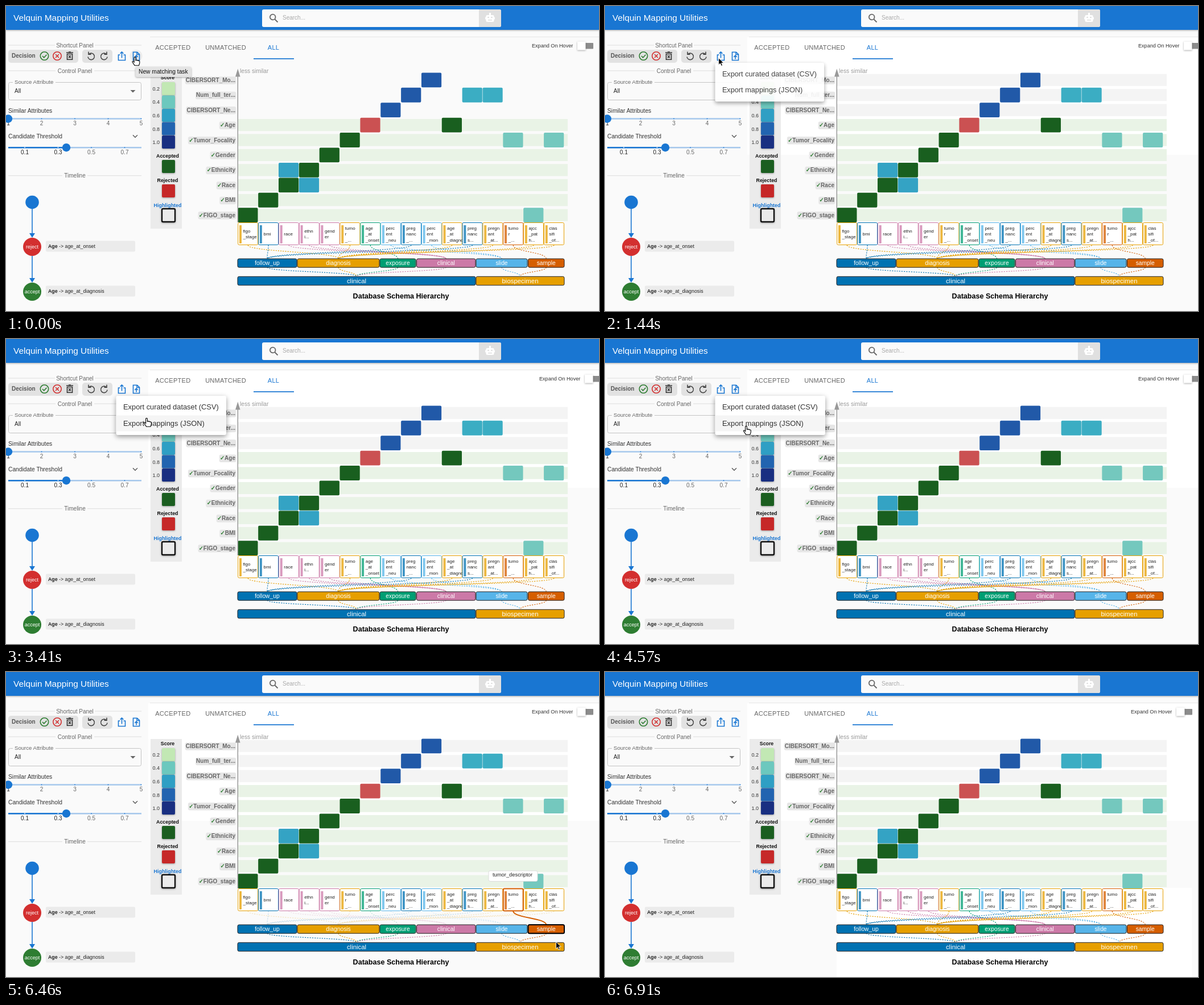
These frames come from a looping animation (1042x537 px, 7470 ms). An HTML page:

```html
<!DOCTYPE html>
<html lang="en">
<head>
<meta charset="utf-8">
<title>Schema matching</title>
<style>
html, body { margin: 0; width: 100%; height: 100%; overflow: hidden; background: #fafafa; }
svg { display: block; width: 1042px; height: 537px; font-family: "Liberation Sans", Arial, sans-serif; }
text { white-space: pre; }
.soft { filter: drop-shadow(0 1px 1.5px #0005); }
.menu { filter: drop-shadow(0 3px 4px #0006); }
</style>
</head>
<body>
<svg id="stage" viewBox="0 0 1042 537"></svg>
<script>
const LOOP = 7470, BLUE = '#1976d2', GREEN = '#1b5e20';
const text = (x, y, s, size, fill = '#333', more = '') =>
  `<text x="${x}" y="${y}" font-size="${size}" fill="${fill}" ${more}>${s}</text>`;
const mid = (x, y, s, size, fill, more = '') => text(x, y, s, size, fill, 'text-anchor="middle" ' + more);
const rect = (x, y, w, h, fill, more = '') =>
  `<rect x="${x}" y="${y}" width="${w}" height="${h}" fill="${fill}" ${more}/>`;
const path = (d, stroke, width = 1, more = '') =>
  `<path d="${d}" fill="none" stroke="${stroke}" stroke-width="${width}" ${more}/>`;
const circle = (x, y, r, fill, more = '') => `<circle cx="${x}" cy="${y}" r="${r}" fill="${fill}" ${more}/>`;
const group = (id, body, more = '') => `<g id="${id}" ${more}>${body}</g>`;
const BOLD = 'font-weight="bold"';

function header() {
  return rect(0, 0, 1042, 42, BLUE, 'class="soft"') +
    text(13, 25.5, 'Velquin Mapping Utilities', 15.4, '#fff') +
    rect(450, 6, 420, 31, '#fafafa', 'rx="3"') +
    path('M831 6h36a3 3 0 0 1 3 3v25a3 3 0 0 1-3 3h-36z', 'none', 0, 'style="fill:#e0e0e0"') +
    path('M472.5 23.5l5 5M473.5 19.5a4.8 4.8 0 1 1-9.6 0a4.8 4.8 0 1 1 9.6 0z', '#666', 1.8) +
    text(486, 24.3, 'Search...', 10, '#aaa') +
    rect(843.5, 16, 14, 12, '#fff', 'rx="2"') + rect(849, 12, 3, 4, '#fff') +
    rect(842, 19, 17, 5, '#fff', 'rx="2"') +
    circle(847.5, 20, 1.3, '#ddd') + circle(853.5, 20, 1.3, '#ddd') + rect(847, 24, 7, 1.4, '#ddd');
}

function divider(label, y, half) {
  return path(`M4 ${y}H${119 - half}M${123 + half} ${y}H238`, '#ddd') + mid(121, y + 3.7, label, 10, '#666');
}

function slider(y, value, ticks) {
  return path(`M4 ${y}H238`, '#a6c8ec', 2.5) + path(`M4 ${y}H${value}`, BLUE, 2.5) +
    ticks.map(([x, s]) => rect(x - .7, y - .8, 1.4, 1.6, x < value ? '#fff' : BLUE) +
      mid(x, y + 11.8, s, 10, x < value ? '#222' : '#666')).join('') +
    circle(value, y, 7.2, BLUE);
}

function sidebar() {
  const node = (y, r, fill, s = '') => circle(46, y, r, fill) + mid(46, y + 3, s, 9, '#fff');
  const arrow = (a, b) => path(`M46 ${a}V${b - 5}`, BLUE, 1.6) +
    `<path d="M41 ${b - 8}h10l-5 8z" fill="${BLUE}"/>`;
  const note = (y, s) => rect(70, y, 157, 19, '#ebebeb', 'rx="2"') +
    text(74, y + 12, `<tspan ${BOLD}>Age</tspan> -&gt; ${s}`, 8.8, '#222');
  return divider('Shortcut Panel', 69, 33) +
    rect(4, 77, 123, 23, '#e2e2e2', 'rx="5"') + rect(134, 77, 53, 23, '#e2e2e2', 'rx="5"') +
    text(10, 91, 'Decision', 10, '#555', BOLD) +
    circle(67.5, 88, 7.2, 'none', 'stroke="#2e7d32" stroke-width="1.6"') + path('M64 88l2.7 2.8l4.8-5', '#2e7d32', 1.6) +
    circle(90, 88, 7.2, 'none', 'stroke="#d32f2f" stroke-width="1.6"') + path('M87 85l6 6m0-6l-6 6', '#d32f2f', 1.5) +
    path('M106 82h12M110 81h4M107.5 84.5h9v9.8h-9zM110 87l4 4.5m0-4.5l-4 4.5', '#333', 1.6) +
    path('M146 84.5a5.7 5.7 0 1 1-2 5M145 80.5v4.6h4.6', '#444', 1.6) +
    path('M176 84.5a5.7 5.7 0 1 0 2 5M177 80.5v4.6h-4.6', '#444', 1.6) +
    circle(228.5, 88, 11, '#ececec', 'id="halo"') +
    path('M200.5 86h-3v9.5h12V86h-3M203.5 91.5V81M200.5 83.8l3-3l3 3', BLUE, 1.6) +
    path('M223.5 81.2h7l4 4v10.3h-11zM230 81.5v4h4M229 93.5v-6M226.3 89.8l2.7-2.7l2.7 2.7', BLUE, 1.6) +
    divider('Control Panel', 114, 32) +
    rect(4.5, 134.5, 233, 31, 'none', 'rx="3" stroke="#c4c4c4"') + rect(12, 132, 75, 5, '#fafafa') +
    text(15, 137, 'Source Attribute', 9.6, '#666') + text(15, 153, 'All', 10, '#222') +
    '<path d="M218.5 148h9l-4.5 4.5z" fill="#666"/>' +
    text(4, 188.3, 'Similar Attributes', 10.3) +
    mid(4, 210, '1', 10, '#222') +
    slider(198.5, 4, [[62.5, 2], [121, 3], [179.5, 4], [237.5, 5]]) +
    text(4, 232.6, 'Candidate Threshold', 10.25) + path('M223 227.3l4 4l4-4', '#555', 1.3) +
    slider(249.2, 106, [[33, '0.1'], [91.5, '0.3'], [150, '0.5'], [208.5, '0.7']]) +
    divider('Timeline', 298.7, 20) +
    arrow(357, 408) + arrow(440, 487) +
    node(345.5, 11.8, BLUE) + node(424, 16, '#d32f2f', 'reject') + node(503, 16, '#2e7d32', 'accept') +
    note(413.5, 'age_at_onset') + note(492.5, 'age_at_diagnosis');
}

function legend() {
  const swatch = (y, fill, more = '') => rect(274, y, 23, 23, fill, 'rx="2" class="soft" ' + more);
  const scale = ['#c2e8b4', '#6cc8be', '#2f9fc4', '#2264b0', '#192f81'];
  return rect(254, 118, 55, 274, '#ebebeb') +
    mid(284, 129, 'Score', 8.8, '#111', BOLD) +
    scale.map((c, i) => swatch(134 + 23.5 * i, c) +
      text(270, 148.7 + 23.6 * i, ((i + 1) / 5).toFixed(1), 9, '#333', 'text-anchor="end"')).join('') +
    mid(284, 267, 'Accepted', 8.9, '#111', BOLD) + swatch(271, GREEN) +
    mid(284, 310, 'Rejected', 8.9, '#111', BOLD) + swatch(314, '#c62828') +
    mid(284, 353.5, 'Highlighted', 8.9, BLUE, BOLD) + swatch(357, '#ebebeb', 'stroke="#111" stroke-width="2.4"');
}

const rowY = i => 130.3 + 26.43 * i, colX = i => 407.3 + 35.85 * i;

function heatmap() {
  const labels = ['CIBERSORT_Mo...', 'Num_full_ter...', 'CIBERSORT_Ne...', 'Age', 'Tumor_Focality',
    'Gender', 'Ethnicity', 'Race', 'BMI', 'FIGO_stage'];
  const paint = { g: '#195f1f', r: '#cb5152', d: '#2159a8', m: '#3badc3', b: '#34a3c4', t: '#74c8be' };
  const cells = ['9d', '8d 11m 12m', '7d', '6r 10g', '5g 13t 15t', '4g', '2b 3g', '2g 3b', '1g', '0g 14t'];
  const stripe = (i, c) => rect(407, rowY(i) - 10.6, 580, 21.2, c);
  return group('pale', [0, 1, 2].map(i => stripe(i, '#f4f4f4')).join('')) +
    [3, 4, 5, 6, 7, 8, 9].map(i => stripe(i, '#e9f3e6')).join('') +
    labels.map((s, i) => text(403, rowY(i) + 3.6, (i > 2 ? '<tspan fill="#2e7d32">✓</tspan>' : '') + s,
      10, '#666', `class="label" text-anchor="end" ${BOLD}`)).join('') +
    cells.map((row, i) => row.split(' ').map(c => rect(colX(parseInt(c)), rowY(i) - 12.9, 35.2, 25.8,
      paint[c.slice(-1)], 'rx="2"')).join('')).join('') +
    path('M407.3 122V381', '#999', 1.5) + '<path d="M403 124.5l4.3-14l4.3 14z" fill="#999"/>' +
    text(411, 118, 'less similar', 10.2, '#999');
}

function hierarchy() {
  const tables = [['follow_up', 407, 511, '#0072b2', 616], ['diagnosis', 512, 656, '#e69f00', 616],
    ['exposure', 657, 720, '#009e73', 616], ['clinical', 721.5, 825, '#cc79a7', 616],
    ['slide', 826, 916, '#56b4e9', 903.5], ['sample', 917.5, 981, '#d55e00', 903.5]];
  const owner = [1, 0, 3, 3, 3, 1, 2, 4, 0, 4, 1, 0, 1, 5, 1, 1];
  const names = ['figo _stage', 'bmi', 'race', 'ethn i...', 'gend er', 'tumo r _...', 'age _at _onset', 'perc ent _neu',
    'preg nanc _...', 'perc ent _mon', 'age _at _diagnosis', 'preg nanc s...', 'pregn ant _at...', 'tumo r _...',
    'ajcc _pat h...', 'clas sifi _of...'];
  const centre = t => (t[1] + t[2]) / 2;
  const curve = (x, y, u, v) => `M${x} ${y}C${x} ${(y + v) / 2} ${u} ${(y + v) / 2} ${u} ${v}`;
  const dash = 'stroke-dasharray="2.2 2"';
  const bar = (x, u, y, h, c, s, size) => rect(x, y, u - x, h, c, 'rx="2.5" stroke="#222"') +
    mid((x + u) / 2, y + h / 2 + size * .36, s, size, '#fff');
  const boxes = names.map((s, i) => {
    const x = colX(i), c = tables[owner[i]][3], lines = s.split(' ');
    return rect(x + .4, 381.5, 35, 39, '#fff', `rx="2" stroke="${c}"`) +
      rect(x + 2.7, 386, 4, 32, c, 'opacity=".75"') +
      lines.map((l, k) => text(x + 9.3, 404.2 + 10.5 * (k - (lines.length - 1) / 2), l, 8, '#222')).join('');
  }).join('');
  const links = names.map((s, i) =>
    path(curve(colX(i) + 17.9, 421, centre(tables[owner[i]]), 445), tables[owner[i]][3], 1.1, dash)).join('');
  return group('links', links) +
    tables.map(t => path(curve(centre(t), 460, t[4], 476), t[3], 1.1, dash)).join('') + boxes +
    tables.map(t => bar(t[1], t[2], 445, 15.2, t[3], t[0], 10.3)).join('') +
    bar(407, 825, 476.3, 15.4, '#0072b2', 'clinical', 11.4) + bar(826, 981, 476.3, 15.4, '#e69f00', 'biospecimen', 11.4) +
    mid(694, 515.3, 'Database Schema Hierarchy', 12.55, '#000', BOLD) +
    group('focus', path(curve(891.2, 421, 949.2, 445), '#d55e00', 2) +
      rect(873.7, 381.5, 35, 39, 'none', 'rx="2" stroke="#d55e00" stroke-width="2"') +
      rect(917.5, 445, 63.5, 15.2, 'none', 'rx="2.5" stroke="#000" stroke-width="2"')) +
    group('descriptor', rect(848, 350, 86, 18.5, '#fff', 'rx="3" stroke="#ddd"') +
      text(855, 360.3, 'tumor_descriptor', 9.35, '#222'));
}

const stage = document.getElementById('stage');
stage.innerHTML = rect(0, 0, 1042, 537, '#fafafa') +
  rect(250, 55, 792, 207, '#fff', 'id="card"') + rect(407, 380, 624, 157, '#fff', 'id="floor"') +
  header() + path('M253 54.5H1042', '#e6e6e6') +
  mid(293.3, 77.3, 'ACCEPTED', 11, '#666', 'letter-spacing=".3"') +
  mid(386, 77.3, 'UNMATCHED', 11, '#666', 'letter-spacing=".25"') +
  mid(470, 77.3, 'ALL', 11, BLUE, 'letter-spacing=".3"') + rect(435, 92, 71, 1.7, BLUE) +
  group('toggle', text(924, 73, 'Expand On Hover', 9.1, '#333') +
    rect(1010, 65, 22, 10.5, '#8c8c8c', 'rx="1"') + rect(1004, 62.5, 14.5, 15, '#fff', 'class="soft"')) +
  sidebar() + legend() + heatmap() + hierarchy() +
  group('tip', rect(227.5, 107, 98, 18, '#e4e4e4', 'rx="3" class="soft"') +
    text(233, 119.3, 'New matching task', 10.25, '#111')) +
  group('menu', rect(193.5, 100, 193.5, 69, '#fff', 'rx="3" class="menu"') +
    rect(193.5, 106, 193.5, 28, '#f5f5f5', 'id="hover"') +
    text(206, 124, 'Export curated dataset (CSV)', 12.85) + text(206, 152.8, 'Export mappings (JSON)', 12.85)) +
  group('cursor',
    '<path id="arrow" d="M0 0V12.2l2.8-2.6l1.9 4.4l2.1-.9l-1.9-4.3h3.9z" fill="#000" stroke="#fff" stroke-width=".9"/>' +
    '<path id="hand" d="M-1.4 1.3a1.4 1.4 0 0 1 2.8 0V5.6c.6-.8 2-.6 2.4.3c.8-.6 2-.3 2.3.6c1-.5 2.1 0 2.2 1V10' +
    'c0 2-1 3-1.3 4.8H-.5C-1 13-3.4 10.8-4.5 8.8c-.5-1.3.8-2 2-1l1.1 1.2z" fill="#fff" stroke="#000" stroke-width="1.1"/>');

stage.querySelectorAll('.label').forEach(label => {
  const box = label.getBBox();
  label.insertAdjacentHTML('beforebegin', rect(box.x - 1, box.y - .7, box.width + 2, 13.5, '#e6e6e6', 'rx="3"'));
});

const el = id => document.getElementById(id);
const show = (id, on) => el(id).setAttribute('opacity', +on);

// Cursor moves: start, end, number of steps, x, y
const moves = [[0, 0, 1, 226.5, 90], [810, 990, 3, 202, 89], [1350, 1350, 1, 199.7, 91.5], [1980, 2240, 4, 247, 120.5],
  [3320, 3500, 3, 247, 149], [3860, 3940, 2, 229, 152], [4570, 4570, 1, 248, 153.5], [4660, 4930, 4, 231, 125],
  [5470, 5740, 4, 588, 102], [5920, 6010, 2, 594.5, 98.5], [6190, 6460, 4, 966.5, 475], [6730, 6910, 3, 1031, 540]];

function cursorAt(t) {
  let x = 0, y = 0;
  for (const [start, end, steps, toX, toY] of moves) {
    if (t < start) break;
    const pause = (end - start) / (steps - 1) || 1;
    const p = Math.min(1, (1 + Math.floor((t - start) / pause + .001)) / steps);
    x += (toX - x) * p;
    y += (toY - y) * p;
  }
  return [x, y];
}

function menuAlpha(t) {
  if (t < 1350 || t >= 6370) return 0;
  if (t < 1440) return .4;
  if (t < 1530) return .91;
  return t < 6190 ? 1 : t < 6280 ? .6 : .15;
}

function draw(now) {
  const t = now % LOOP, [x, y] = cursorAt(t), alpha = menuAlpha(t);
  const overMenu = alpha === 1 && x > 194 && x < 387 && y > 106 && y < 163;
  const hand = t < 1350 || overMenu;
  el('cursor').setAttribute('transform', `translate(${x} ${y})`);
  show('hand', hand);
  show('arrow', !hand);
  show('tip', t < 810);
  show('halo', t < 900);
  show('menu', alpha);
  const size = t < 1440 ? .96 : t < 1530 ? .99 : 1;
  el('menu').setAttribute('transform', `translate(194 100) scale(${size}) translate(-194 -100)`);
  show('hover', overMenu);
  el('hover').setAttribute('y', y < 134 ? 106 : 134.5);
  el('toggle').setAttribute('transform', `translate(${alpha ? 13 : 0} 0)`);
  show('card', t >= 1350);
  show('pale', t >= 1350);
  show('floor', t >= 6730);
  const focus = t >= 6370 && t < 6730;
  show('focus', focus);
  show('descriptor', focus && t < 6550);
  show('links', focus ? .25 : 1);
  requestAnimationFrame(draw);
}
requestAnimationFrame(draw);
</script>
</body>
</html>
```
